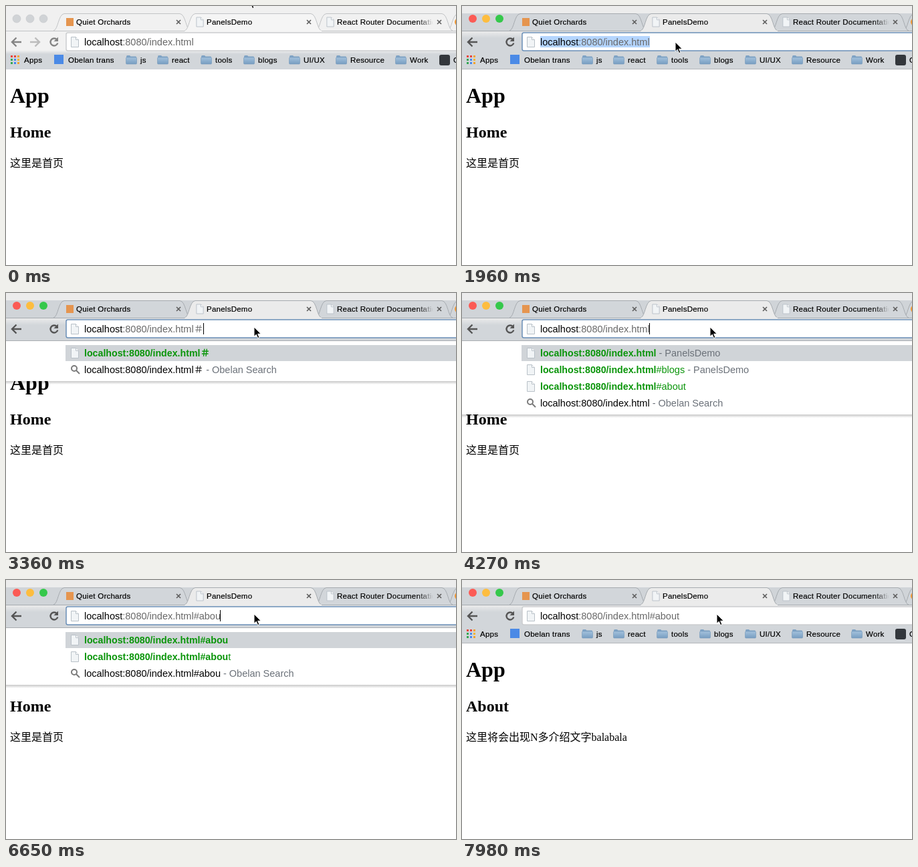
Animation, 673 px wide and 388 px high, one loop 8 s. Source, as an HTML page:

```html
<!DOCTYPE html>
<html lang="en">
<head>
<meta charset="utf-8">
<title>Hash routing</title>
<style>
  html, body { margin: 0; width: 100%; height: 100%; overflow: hidden; background: #fff; }
  svg { display: block; width: 673px; height: 388px; }
  text { white-space: pre; }

  #stage { --top: #f0f0f0; --strip: #f0f0f0; --tab: #f1f1f1; --front: #f5f5f5; --line: #c2c4c6; --bar: #f2f2f2; --nav: #858585; --ring: #cbcdcf; }
  #stage.on { --top: #ececec; --strip: #d0d4d8; --tab: #d2d6da; --front: #ebebeb; --line: #a6abb0; --bar: #d2d6da; --nav: #555; }
  #stage.focus { --ring: #6b90b8; }

  .ui { font: 11.5px "Liberation Sans", Arial, sans-serif; letter-spacing: .25px; }
  .ui text { stroke-width: .2; }
  .url { font: 14.5px "Liberation Sans", Arial, sans-serif; }
  .page { font: 16px "Liberation Serif", "Noto Sans CJK SC", serif; }
  .page .h1 { font-size: 32px; font-weight: bold; }
  .page .h2 { font-size: 24px; font-weight: bold; }

  .tab { fill: var(--tab); stroke: var(--line); }
  .tab.front { fill: var(--front); }
  .nav { fill: none; stroke: var(--nav); stroke-width: 2.4; }
  .close { stroke: #5c5c5c; stroke-width: 1.6; }
  .light { fill: #d0d3d6; stroke: #c4c7ca; stroke-width: .6; }
  .on .light { fill: var(--c); stroke: none; }
  .on .idle, #stage:not(.on) .live { display: none; }
  .match { fill: #0a950a; }
  .match .typed { font-weight: bold; font-size: 14.2px; }
  .note { fill: #6b7179; }
</style>
</head>
<body>
<svg id="stage" viewBox="0 0 673 388">
  <defs>
    <symbol id="file" viewBox="0 0 12 16" overflow="visible">
      <path d="M.5 .5H7.5L11.5 4.5V15.5H.5Z" fill="#f1f4f6" stroke="#b9c1c8"/>
      <path d="M7.5 .5V4.5H11.5" fill="#fff" stroke="#b9c1c8"/>
    </symbol>
    <symbol id="folder" viewBox="0 0 17 15" overflow="visible">
      <path d="M1 3Q1 1 2.5 1H6L7.5 2.5H15Q16 2.5 16 4V6H1Z" fill="#7fa3c5"/>
      <rect x=".5" y="4" width="16" height="10" rx="1.2" fill="url(#steel)" stroke="#7397b9" stroke-width=".6"/>
    </symbol>
    <symbol id="close" viewBox="-4 -4 8 8" overflow="visible"><path class="close" d="M-3-3 3 3M3-3-3 3"/></symbol>
    <path id="tab" d="M0 37C7 36 7 12.500 16 11.500H189C198 12.500 198 36 205 37"/>
    <linearGradient id="steel" x2="0" y2="1">
      <stop offset="0" stop-color="#a3c1dc"/><stop offset="1" stop-color="#779dc1"/>
    </linearGradient>
    <linearGradient id="fade" gradientUnits="userSpaceOnUse" x1="614" x2="639" y1="0" y2="0">
      <stop offset="0"/><stop offset="1" stop-opacity="0"/>
    </linearGradient>
    <linearGradient id="blend" x2="0" y2="1">
      <stop offset="0" stop-color="#ebebeb"/><stop offset="1" stop-color="#d2d6da"/>
    </linearGradient>
    <linearGradient id="dim" x2="0" y2="1">
      <stop offset="0" stop-color="#f2f2f2"/><stop offset="1" stop-color="#d2d6da"/>
    </linearGradient>
    <linearGradient id="shade" x2="0" y2="1">
      <stop offset="0" stop-color="#000" stop-opacity=".22"/><stop offset="1" stop-color="#000" stop-opacity="0"/>
    </linearGradient>
  </defs>

  <g class="page">
    <text class="h1" x="6" y="145">App</text>
    <text class="h2" x="6" y="197" id="title"></text>
    <text x="6" y="241" id="body"></text>
  </g>

  <!-- tab strip -->
  <rect width="673" height="12" fill="var(--top)"/>
  <rect y="11" width="673" height="27" fill="var(--strip)"/>
  <circle class="light" style="--c:#fb5b55" cx="16" cy="19" r="6"/>
  <circle class="light" style="--c:#fdbd3f" cx="36" cy="19" r="6"/>
  <circle class="light" style="--c:#35c84b" cx="56" cy="19" r="6"/>
  <use href="#tab" class="tab" x="660"/>
  <use href="#tab" class="tab" x="463"/>
  <use href="#tab" class="tab" x="71"/>
  <rect y="37" width="673" height="58" fill="var(--bar)"/>
  <path d="M0 37.500H673" stroke="var(--line)"/>
  <use href="#tab" class="tab front" x="267"/>
  <path d="M267.500 37.500H472" stroke="var(--front)" stroke-width="2"/>
  <rect x="90" y="18" width="11" height="12" fill="#e5954f"/>
  <circle cx="677" cy="24" r="6" fill="#f0962f"/>
  <use href="#file" x="284" y="16.500" width="12" height="15"/>
  <use href="#file" x="479" y="16.500" width="12" height="15"/>
  <use href="#close" x="254" y="20" width="8" height="8"/>
  <use href="#close" x="449" y="20" width="8" height="8"/>
  <use href="#close" x="644" y="20" width="8" height="8"/>
  <g class="ui" stroke="#000">
    <text x="105" y="28">Quiet Orchards</text>
    <text x="300" y="28">PanelsDemo</text>
    <text x="495" y="28" fill="url(#fade)" stroke="url(#fade)">React Router Documentation</text>
  </g>

  <!-- toolbar and bookmarks -->
  <rect class="live" y="38" width="673" height="10" fill="url(#blend)"/>
  <rect class="idle" y="67" width="673" height="28" fill="#d2d6da"/>
  <rect class="idle" y="66" width="673" height="6" fill="url(#dim)"/>
  <path class="live" d="M0 94.500H673" stroke="#b3b7ba"/>
  <path class="nav" d="M23 54H10M15.500 47.500 9 54 15.500 60.500"/>
  <path class="nav idle" d="M36 54H49M43.500 47.500 50 54 43.500 60.500" opacity=".5"/>
  <path class="nav" d="M76 50.200A5.500 5.500 0 1 0 77.300 55.500"/>
  <path d="M78 46.500V53H71.500Z" fill="var(--nav)"/>
  <g class="ui" id="marks">
    <g id="apps"></g>
    <g stroke="#000">
      <text x="27" y="85">Apps</text>
      <text x="93" y="85">Obelan trans</text>
      <text x="669" y="85">C</text>
    </g>
    <rect x="72" y="73" width="14" height="14" fill="#4b8ae6"/>
    <rect x="648" y="73" width="16" height="16" rx="3" fill="#33373c"/>
  </g>

  <!-- suggestions -->
  <g id="menu">
    <rect id="drop" y="72" width="673" fill="#fff"/>
    <rect id="shadow" width="673" height="5" fill="url(#shade)"/>
    <path d="M0 71.500H673" stroke="#a9adb1"/>
    <rect x="89" y="78" width="584" height="24" fill="#d0d4d8"/>
    <g id="rows" class="url"></g>
  </g>

  <!-- address field -->
  <rect x="90" y="40" width="600" height="27" rx="2.500" fill="#fff" stroke="var(--ring)" stroke-width="1.500"/>
  <use href="#file" x="97" y="46" width="12" height="16"/>
  <rect id="pick" x="117" y="45" width="164" height="17" fill="#b4d5fe"/>
  <text class="url" x="117" y="59" id="url">localhost<tspan fill="#686868" id="path"></tspan></text>
  <rect id="caret" y="45" width="1" height="17"/>

  <path id="mouse" d="M0 0V14.200L3.300 11.200 5.600 16.600 7.900 15.600 5.600 10.300H10.200Z" stroke="#fff"/>
</svg>

<script>
const LOOP = 8000, TICK = 70, ROW = 25;
const HOST = 'localhost', PATH = ':8080/index.html';
const $ = id => document.getElementById(id);
const show = (id, on) => $(id).style.display = on ? '' : 'none';
const span = (cls, text) => `<tspan class="${cls}">${text}</tspan>`;

// start time, typed suffix, matching hashes
const typing = [
  [0, '', []],
  [3360, '＃', []],
  [4270, '', ['#blogs', '#about']],
  [4900, '#', ['#blogs']],
  [6020, '#a', ['#about']],
  [6160, '#ab', ['#about']],
  [6440, '#abo', ['#about']],
  [6580, '#abou', ['#about']],
  [6720, '#about', []]
];
const visited = ['', '#blogs'];

// time, x, y of the pointer tip
const track = [
  [350, 363, -13], [1260, 320, 48], [1400, 314, 55], [1890, 314, 55], [2100, 332, 53],
  [2520, 332, 53], [2660, 371, 51], [7840, 371, 51], [7980, 381, 51]
];

const folders = [[179, 'js'], [226, 'react'], [291, 'tools'], [355, 'blogs'], [423, 'UI/UX'], [493, 'Resource'], [582, 'Work']];
$('marks').insertAdjacentHTML('beforeend', folders.map(([x, name]) =>
  `<use href="#folder" x="${x}" y="73" width="17" height="15"/><text x="${x + 22}" y="85" stroke="#000">${name}</text>`).join(''));

const dots = ['#e8453c', '#e8453c', '#f2a32c', '#35a853', '#4688f1', '#f2b52c', '#35a853', '#4688f1', '#f2a32c'];
$('apps').innerHTML = dots.map((c, i) =>
  `<rect x="${7 + i % 3 * 5}" y="${74 + Math.floor(i / 3) * 5}" width="3" height="3" fill="${c}"/>`).join('');

function matchRow(typed, hash, i) {
  const rest = hash.slice(typed.length);
  const note = visited.includes(hash) ? span('note', ' - PanelsDemo') : '';
  return `<use href="#file" x="97" y="${82 + i * ROW}" width="12" height="16"/>
    <text class="match" x="117" y="${95 + i * ROW}">${span('typed', HOST + PATH + typed)}${rest}${note}</text>`;
}

function searchRow(typed, i) {
  const y = 90 + i * ROW;
  return `<g fill="none" stroke="#7a7a7a" stroke-width="2"><circle cx="102" cy="${y - 2}" r="4"/><path d="M105 ${y + 1}l5 5"/></g>
    <text x="117" y="${y + 5}">${HOST + PATH + typed}${span('note', ' - Obelan Search')}</text>`;
}

function fillMenu(typed, hashes) {
  const items = [typed, ...hashes];
  $('rows').innerHTML = items.map((h, i) => matchRow(typed, h, i)).join('') + searchRow(typed, items.length);
  const height = (items.length + 1) * ROW + 10;
  $('drop').setAttribute('height', height);
  $('shadow').setAttribute('y', 72 + height);
}

function pointer(t) {
  const i = track.findIndex(k => k[0] > t);
  if (i < 0) return track[track.length - 1].slice(1);
  if (i === 0) return track[0].slice(1);
  const [t0, x0, y0] = track[i - 1], [t1, x1, y1] = track[i];
  const u = (t - t0) / (t1 - t0), e = u * u * (3 - 2 * u);
  return [x0 + (x1 - x0) * e, y0 + (y1 - y0) * e];
}

let current;
function draw(t) {
  const within = (a, b) => t >= a && t < b;
  const done = t >= 7210;
  const step = typing.filter(s => s[0] <= t).pop();
  if (step !== current) {
    current = step;
    $('path').textContent = PATH + step[1];
    fillMenu(step[1], step[2]);
    $('caret').setAttribute('x', Math.floor(117 + $('url').getComputedTextLength()));
  }
  $('stage').classList.toggle('on', t >= 1610);
  $('stage').classList.toggle('focus', within(1680, 7210));
  show('pick', within(1680, 2310));
  show('caret', within(2310, 2940) || within(3360, 3920) || within(4270, 7210));
  show('menu', within(3360, 7210));
  $('title').textContent = done ? 'About' : 'Home';
  $('body').textContent = done ? '这里将会出现N多介绍文字balabala' : '这里是首页';
  const [x, y] = pointer(Math.floor(t / TICK) * TICK).map(Math.round);
  $('mouse').setAttribute('transform', `translate(${x} ${y})`);
}

const start = performance.now();
function loop() {
  draw((performance.now() - start) % LOOP);
  requestAnimationFrame(loop);
}
loop();
</script>
</body>
</html>
```
